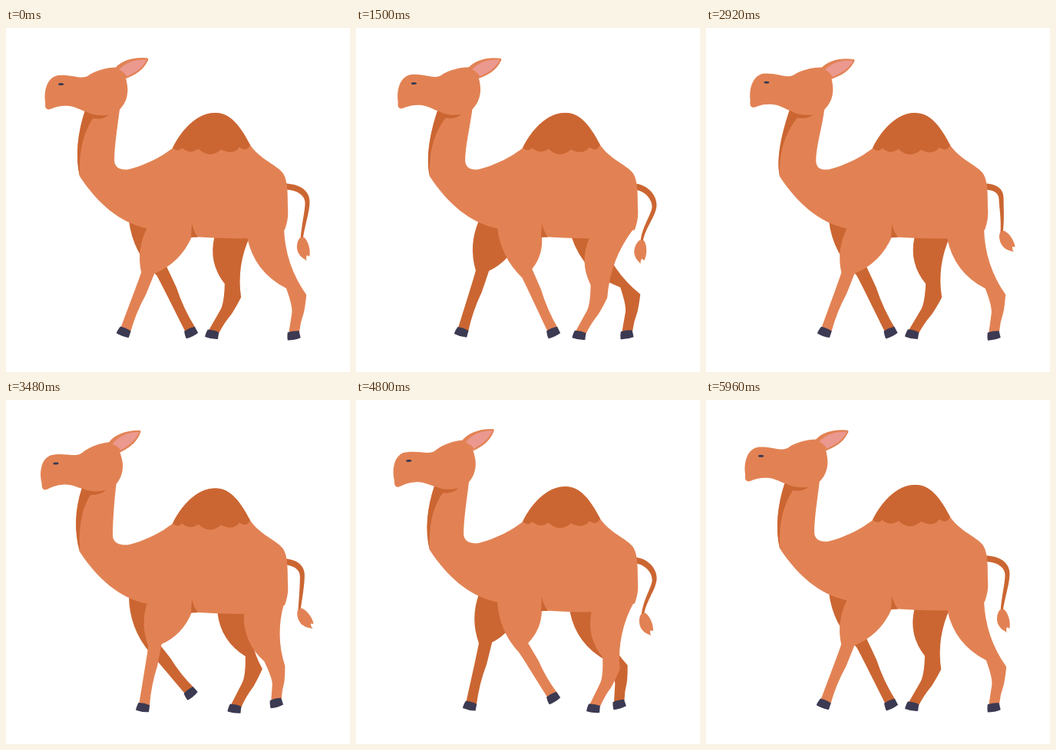
An HTML page that plays this animation: 448 px wide and 450 px high, repeating every 5.98 s.

```html
<!DOCTYPE html>
<html lang="en">
<head>
<meta charset="utf-8">
<title>Walking camel</title>
<style>
  html, body { margin: 0; width: 100%; height: 100%; overflow: hidden; background: #fff; }
  svg { display: block; width: 100%; height: 100%; }
  .coat { fill: #e28254; }
  .shade { fill: #cb6632; }
  .hoof { fill: #3c3a52; }
  .pink { fill: #eb988f; }
</style>
</head>
<body>
<svg viewBox="0 0 448 450">
  <path id="tail" class="shade"/>
  <path id="tuft" class="coat" d="M-2 0C-8 5-9 16-6 21C-4 26 0 28 3 31C2 28 3 25 4 24L7 26C10 18 8 5 3 0Z"/>
  <g id="farFront" class="shade"></g>
  <g id="farHind" class="shade"></g>
  <path id="body" class="coat"/>
  <path id="throat" class="shade"/>
  <g id="nearHind" class="coat"></g>
  <g id="nearFront" class="coat"></g>
  <g id="marks" class="shade">
    <path d="M217 157C232 127 253 110.5 273 111C292 111 305 128 318 153Q313 163 304 156Q296 167 280 159Q265 172 250.5 158Q240 166 229.5 157Q224 163 217 157Z"/>
    <path d="M242 255Q244 266 250 273.5L241 274Z"/>
  </g>
  <g id="head">
    <path class="coat" d="M144 52C130 52 116 57 109 61.5C104 66 98 66 88 64C80 62.5 72 62 66 63C59 65 55 70 52.5 77C50 84 50 92 51 98C51 103 50 106 55 107.5C60 107 64 102.5 78 102.5C90 102.5 98 109 104 110Q116 117 134 114Q141 113 148 107C156 99 159 88 158 78C157 66 153 58 148 52Z"/>
    <path class="coat" d="M142 53C150 43 166 38 184 40Q186 41 184 44C178 56 168 62 155 67Z"/>
    <path class="pink" d="M147 55C156 45 168 41 183 42C178 52 170 58 157 64Q154 58 147 55Z"/>
    <ellipse class="hoof" cx="71.5" cy="74.2" rx="3.6" ry="1.5"/>
  </g>
</svg>
<script>
const LOOP = 5980, STRIDE = LOOP / 2, STEP = LOOP / 4, TICK = 20;
const { sin, cos, PI } = Math;
const $ = id => document.getElementById(id);
const setD = (el, d) => el.setAttribute('d', d);
const move = (el, s) => el.setAttribute('transform', s);

const add = (a, b) => [a[0] + b[0], a[1] + b[1]];
const mix = (a, b, u) => [a[0] + (b[0] - a[0]) * u, a[1] + (b[1] - a[1]) * u];
const span = (p, a, b) => Math.min(1, Math.max(0, (p - a) / (b - a)));
const ramp = (p, a, b) => (1 - cos(PI * span(p, a, b))) / 2;
const bump = (p, a, b) => sin(PI * span(p, a, b)) ** 2;

function spin([x, y], deg) {
  const r = deg * PI / 180;
  return [x * cos(r) - y * sin(r), x * sin(r) + y * cos(r)];
}

// Control point beside the middle of a-b, k chord lengths to the side.
const bow = (a, b, k) => add(mix(a, b, 0.5), [(a[1] - b[1]) * k, (b[0] - a[0]) * k]);

// Knee and foot for a stride phase from 0 to 1.
function frontPose(p) {
  const lift = bump(p, 0.5, 0.9);
  return [
    [204 - 20 * cos(2 * PI * p), 323 + 6 * lift],
    [154 + 103 * (ramp(p, 0, 0.5) - ramp(p, 0.65, 1)), 398 + 6 * bump(p, 0, 0.5) - 16 * lift]
  ];
}

function hindPose(p) {
  const a = 2 * PI * p;
  return [
    [348 + 24 * cos(a) + 8 * cos(3 * a), 351],
    [375 - 84 * (ramp(p, 0, 0.47) - span(p, 0.5, 0.97)), 402 - 8 * bump(p, 0, 0.5) + 4 * bump(p, 0.5, 1)]
  ];
}

// Outline offsets from the knee: front and back, upper and lower.
const FRONT = { tf: [-8.5, 0], lf: [-8, 8], lb: [8, 6], tb: [8, -5], bulge: [0.18, 0.2], tilt: 0 };
const HIND = { tf: [-16, -9], lf: [-5, 14], lb: [11, 12], tb: [11, -3], bulge: [0.24, -0.15], tilt: -15 };
const HOOF = 'M-7.5-5Q0-6.5 7.5-4.5L8 4.5Q0 6.5-9 5Q-9.5 2-7.5-5Z';

for (const id of ['farFront', 'farHind', 'nearFront', 'nearHind'])
  $(id).innerHTML = `<path/><path class="hoof" d="${HOOF}"/>`;

function drawLeg(id, [knee, foot], top, rear, kind) {
  const lean = Math.atan2(knee[0] - foot[0], foot[1] - knee[1]) * 180 / PI;
  const tilt = lean + kind.tilt;
  const joint = key => add(knee, spin(kind[key], lean));
  const tf = joint('tf'), lf = joint('lf'), lb = joint('lb'), tb = joint('tb');
  const af = add(foot, spin([-6.5, -3], tilt)), ab = add(foot, spin([7.5, -3], tilt));
  const calf = mix(lb, ab, 0.25);
  const [limb, hoof] = $(id).children;
  setD(limb, `M${top}Q${bow(top, tf, kind.bulge[0])} ${tf}Q${lf} ${mix(lf, af, 0.25)}L${af}L${ab}`
    + `Q${bow(ab, calf, -0.06)} ${calf}Q${lb} ${tb}Q${bow(tb, rear, kind.bulge[1])} ${rear}`
    + `L${add(rear, [0, -20])}L${add(top, [0, -20])}Z`);
  move(hoof, `translate(${foot}) rotate(${tilt})`);
}

function drawLegs(t, dy) {
  const near = t / STRIDE % 1, far = (near + 0.5) % 1;
  const shift = (pose, knee, foot) => [add(pose[0], knee), add(pose[1], foot)];
  const hip = (pose, x) => [x + pose[0][0] * 0.15, 274 + dy];
  const nearHind = hindPose(near);
  const farHind = shift(hindPose(far), [-21, -1], [-22, -1]);
  const farFront = shift(frontPose(far), [-20, -3], [-16, 0]);
  drawLeg('farFront', farFront, [160, 252 + dy], [212, 275 + dy], FRONT);
  drawLeg('farHind', farHind, hip(farHind, 227), [318, 272 + dy], HIND);
  drawLeg('nearHind', nearHind, hip(nearHind, 257), [362, 262 + dy], HIND);
  drawLeg('nearFront', frontPose(near), [184, 261 + dy], [242, 273 + dy], FRONT);
}

function drawTail(t, dy) {
  const q = 2 * PI * t / LOOP;
  const raise = (1 + cos(2 * q)) / 2;
  const ex = 391.5 + 4 * cos(q) * raise, ey = 231.5 - (7 - 2.5 * cos(q)) * raise + dy;
  const tx = 372 + 13 * raise, ty = 277.5 - (7.5 - 4 * cos(q)) * raise + dy;
  const angle = 5 + 12 * raise - 10 * cos(q) - 13 * sin(q);
  const y = 203.5 + dy;
  setD($('tail'), `M360 ${y}C${ex - 16} ${y - 1} ${ex} ${ey - 16} ${ex} ${ey}`
    + `C${ex} ${ey + 14} ${tx + 4} ${ty - 16} ${tx + 1.5} ${ty + 3}L${tx - 1.5} ${ty + 3}`
    + `C${tx} ${ty - 18} ${ex - 6} ${ey + 12} ${ex - 6} ${ey + 2}`
    + `C${ex - 6} ${ey - 9} ${ex - 18} ${y + 7} 360 ${y + 8}Z`);
  move($('tuft'), `translate(${tx} ${ty}) rotate(${-angle})`);
}

function drawBody(t, dy) {
  const p = 2 * PI * t / STEP, far = cos(2 * PI * t / LOOP);
  const ex = 60 + (15 - 3.75 * far) * (1 + cos(p + 0.05)) / 2;
  const ey = 79 - 7 * cos(p + 0.26) + far;
  const rot = -1.8 + 3.6 * cos(p + 0.78) - 0.6 * far;
  const onHead = (x, y) => add([ex, ey], spin([x - 71, y - 74], rot));
  const at = (x, y) => [x, y + dy];
  const jaw = onHead(103, 108), nape = onHead(148, 106);
  const sway = (ex - 71) * 0.3;
  const throat = `M${jaw}C${add(jaw, [-10, 30])} ${at(90 + sway * 0.5, 168)} ${at(96, 194)}`;

  setD($('body'), throat
    + `C${at(119, 229)} ${at(147, 254)} ${at(183, 262)}L${at(243, 273)}`
    + `C${at(265, 274)} ${at(290, 276)} ${at(314, 275)}L${at(363, 264)}`
    + `C${at(366, 255)} ${at(368, 248)} ${at(367, 235)}C${at(367, 210)} ${at(366, 197)} ${at(360, 189)}`
    + `C${at(352, 179)} ${at(330, 171)} ${at(318, 153)}C${at(305, 128)} ${at(292, 111)} ${at(273, 111)}`
    + `C${at(253, 110.5)} ${at(232, 127)} ${at(217, 157)}C${at(205, 167)} ${at(181, 180)} ${at(159, 185)}`
    + `C${at(150, 186)} ${at(141 + sway, 183)} ${at(141 + sway, 173)}`
    + `C${at(141 + sway, 155)} ${add(nape, [-3, 24])} ${nape}L${onHead(120, 90)}Z`);
  setD($('throat'), throat
    + `C${at(95, 165)} ${at(99 + sway, 140)} ${onHead(113, 119)}`
    + `Q${onHead(127, 121)} ${onHead(134, 113.5)}L${onHead(115, 106)}Z`);
  move($('head'), `translate(${ex - 71} ${ey - 74}) rotate(${rot} 71 74)`);
  move($('marks'), `translate(0 ${dy})`);
}

function draw(t) {
  const dy = 3 - 3 * cos(2 * PI * t / STEP);
  drawTail(t, dy);
  drawBody(t, dy);
  drawLegs(t, dy);
}

const start = performance.now();
function tick() {
  const t = (performance.now() - start) % LOOP;
  draw(Math.floor(t / TICK) * TICK);
  requestAnimationFrame(tick);
}
tick();
</script>
</body>
</html>
```
